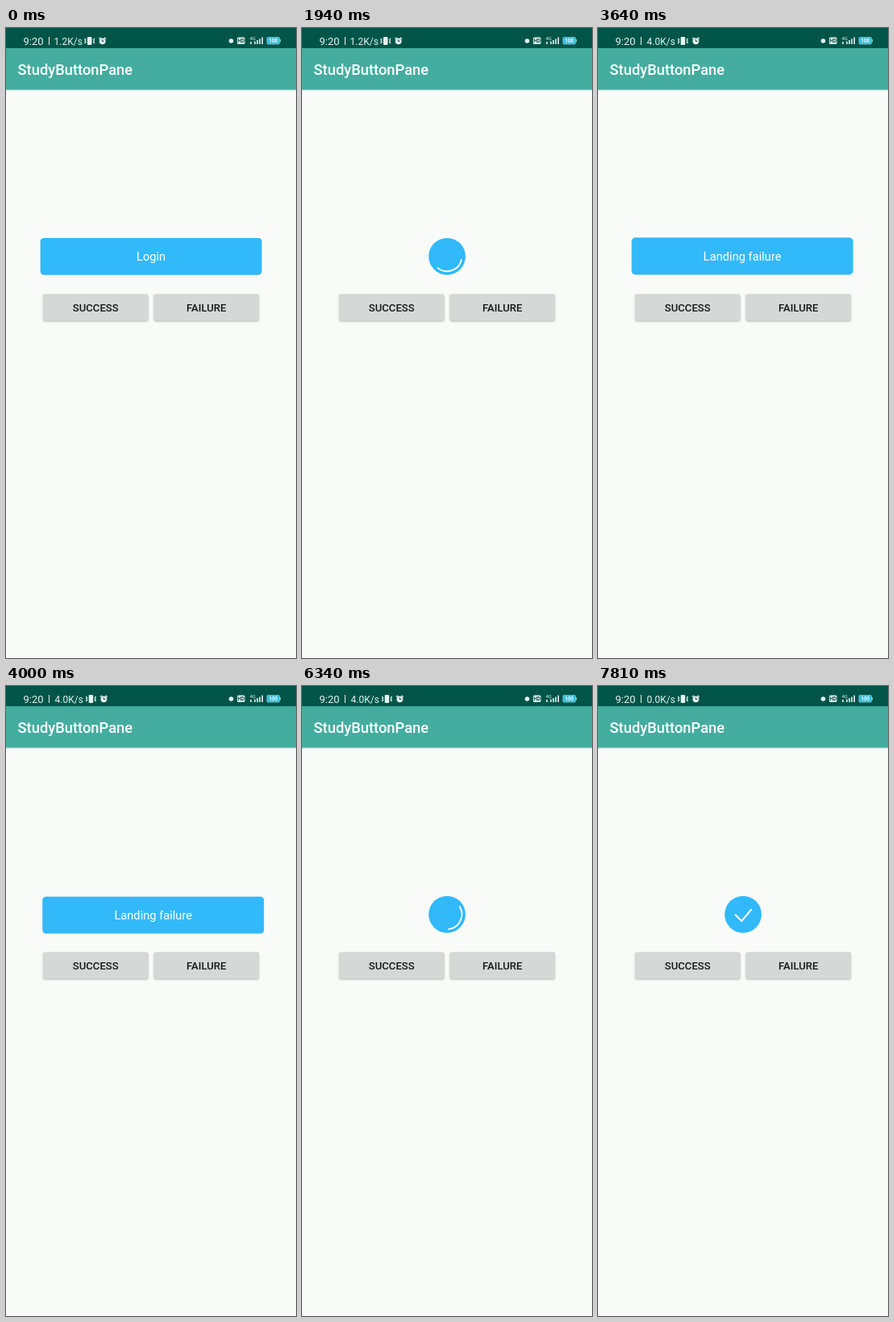
Recreate the animation shown at these times as an HTML page. Size 360 px wide and 780 px high, loop 8 s.

```html
<!DOCTYPE html>
<html lang="en">
<head>
<meta charset="utf-8">
<title>Login button</title>
<style>
  html, body { margin: 0; width: 100%; height: 100%; overflow: hidden; background: #f9fbf8; }
  svg { display: block; width: 360px; height: 780px; font-family: Roboto, sans-serif; }
  .mid { text-anchor: middle; }
  .key { font-size: 13.1px; font-weight: 500; fill: #171818; }
</style>
</head>
<body>
<svg viewBox="0 0 360 780">
  <defs>
    <linearGradient id="shade" x2="0" y2="1">
      <stop stop-color="#dfe6e2"/><stop offset="1" stop-color="#f9fbf8"/>
    </linearGradient>
    <filter id="blur" x="-10%" y="-30%" width="120%" height="160%"><feGaussianBlur stdDeviation="2.4"/></filter>
    <filter id="soft" x="-10%" y="-30%" width="120%" height="160%"><feGaussianBlur stdDeviation=".8"/></filter>
  </defs>
  <rect width="360" height="780" fill="#f9fbf8"/>
  <rect y="76" width="360" height="3" fill="url(#shade)"/>
  <rect width="360" height="76.5" fill="#44ada0"/>
  <rect width="360" height="25" fill="#005548"/>
  <text x="14.5" y="58" font-size="18.35" font-weight="500" fill="#fff">StudyButtonPane</text>

  <g fill="#e9f3f1">
    <text x="21.5" y="20.5" font-size="13">9:20</text>
    <rect x="53" y="11" width="1" height="10"/>
    <text id="speed" x="60" y="20.5" font-size="12"></text>
    <g id="icons">
      <rect x="101" y="11" width="5.5" height="10" rx="1"/>
      <path d="M97.5 13l1.5 1.5-1 1.5 1 1.5-1.5 1.5M110 13l-1.5 1.5 1 1.5-1 1.5 1.5 1.5" fill="none" stroke="#e9f3f1" stroke-width="1.2"/>
      <circle cx="119.7" cy="16.3" r="3.9"/>
      <path d="M115.5 13.5l2-1.8M124 13.5l-2-1.8" stroke="#e9f3f1" stroke-width="1.4"/>
      <path d="M119.7 14v2.5h2" fill="none" stroke="#005548"/>
    </g>
    <circle cx="279.5" cy="16" r="2.8"/>
    <rect x="287" y="11.5" width="9.5" height="8.5" rx="1.5"/>
    <text x="291.75" y="18.3" class="mid" font-size="6.3" font-weight="700" fill="#005548">HD</text>
    <text x="302.5" y="15" font-size="6">4G</text>
    <path d="M304 20v-3M309 20v-3.5M312 20v-5M315 20v-6.5M318.2 20v-8.5" stroke="#e9f3f1" stroke-width="1.6"/>
    <rect x="324" y="11.5" width="15.5" height="8.5" rx="1.2" fill="#38bad8" stroke="#8fd6e2" stroke-width=".7"/>
    <rect x="340" y="14" width="1" height="3.5" fill="#8fd6e2"/>
    <text x="331.7" y="18.2" class="mid" font-size="6.3" font-weight="700" fill="#fff">100</text>
  </g>

  <g id="keys"></g>

  <g id="button">
    <rect id="pill" fill="#32b9fa"/>
    <text id="label" class="mid" y="5" font-size="14.67" fill="#fff"></text>
    <path id="arc" d="M18.3 0A18.3 18.3 0 0 1 -9.15 15.85" fill="none" stroke="#fff" stroke-width="1.8"/>
    <path id="tick" d="M-10 0L-1.8 8.2L10.5 -6.5" fill="none" stroke="#fff" stroke-width="2" pathLength="1" stroke-dasharray="1 2"/>
  </g>
</svg>
<script>
const LOOP = 8000, SPIN_DEG_PER_MS = 0.72;
const SHRINK = [1426, 5388], EXPAND = 3050, MORPH = 500;
const $ = id => document.getElementById(id);
const set = (el, attrs) => { for (const k in attrs) el.setAttribute(k, attrs[k]); };
const part = (t, start, length) => Math.min(1, Math.max(0, (t - start) / length));
const smooth = p => (1 - Math.cos(Math.PI * p)) / 2;
const mix = (a, b, p) => a + (b - a) * p;

function makeKey(text, x, pressAt) {
  const box = `x="${x}" y="329.5" width="130.3" height="33.1" rx="1.8"`;
  const id = text.toLowerCase(), middle = x + 65.15;
  $('keys').insertAdjacentHTML('beforeend', `
    <clipPath id="${id}-clip"><rect ${box}/></clipPath>
    <rect ${box} transform="translate(0 1)" fill="#000" opacity=".25" filter="url(#soft)"/>
    <rect id="${id}-lift" ${box} transform="translate(0 2)" fill="#000" filter="url(#blur)"/>
    <rect ${box} fill="#d6d8d7"/>
    <circle id="${id}-ripple" cx="${middle + 1.5}" cy="346" clip-path="url(#${id}-clip)"/>
    <text x="${middle}" y="351" class="mid key">${text}</text>`);
  return t => {
    const grow = part(t, pressAt, 300), fade = 1 - part(t, pressAt + 300, 190);
    set($(id + '-lift'), { opacity: 0.2 * grow * fade });
    set($(id + '-ripple'), { r: 70 * Math.sin(grow * Math.PI / 2), opacity: 0.14 * fade });
  };
}
const keys = [makeKey('SUCCESS', 46.1, 6540), makeKey('FAILURE', 183.6, 2570)];

function draw(t) {
  const second = t >= EXPAND;
  const shrinkAt = SHRINK[+second];
  const open = t >= EXPAND && t < SHRINK[1]
    ? smooth(part(t, EXPAND, MORPH))
    : 1 - smooth(part(t, shrinkAt, MORPH));
  const width = mix(45.8, 275, open);
  set($('pill'), { x: -width / 2, y: -22.9, width, height: 45.8, rx: mix(22.9, 4.6, open) });
  $('label').textContent = second ? 'Landing failure' : 'Login';
  set($('label'), { opacity: open });

  const spinAt = shrinkAt + MORPH;
  const spinning = t >= spinAt && t < 7050;
  set($('arc'), {
    opacity: +spinning,
    transform: `rotate(${(t - spinAt) * SPIN_DEG_PER_MS})`
  });
  const ticked = smooth(part(t, 7050, 300));
  set($('tick'), { opacity: +(ticked > 0), 'stroke-dashoffset': 1 - ticked });

  const shake = -Math.sin(2 * Math.PI * part(t, 3620, 450));
  const pulse = 1 + 0.5 * Math.sin(Math.PI * part(t, 7320, 480));
  set($('button'), {
    transform: `translate(${180.1 + 3.2 * shake} ${282.8 + shake}) scale(${pulse})`
  });

  keys.forEach(update => update(t));
  $('speed').textContent = (t < 3400 ? '1.2' : t < 7400 ? '4.0' : '0.0') + 'K/s';
  set($('speed'), { x: t < 3400 ? 59.5 : 60.5 });
  set($('icons'), { transform: `translate(${t < 3400 ? 0 : 1.7})` });
}

const begin = performance.now();
function tick() {
  draw((performance.now() - begin) % LOOP);
  requestAnimationFrame(tick);
}
tick();
</script>
</body>
</html>
```
